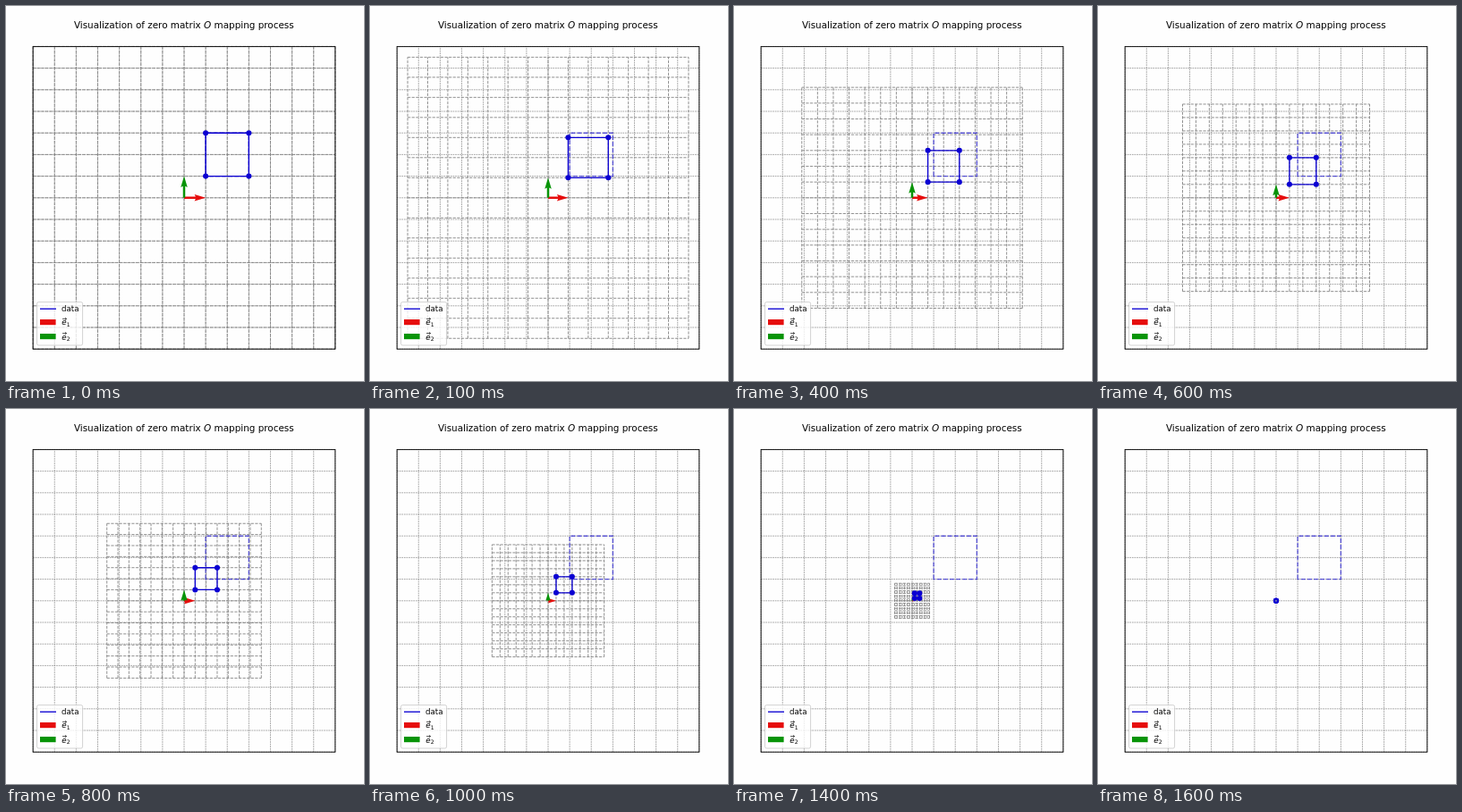
Recreate the animation shown at these times as an HTML page. Size 400x420 px, loop 1700 ms.

```html
<!DOCTYPE html>
<html lang="en">
<head>
<meta charset="utf-8">
<title>Zero matrix mapping</title>
<style>
  html, body { margin: 0; width: 100%; height: 100%; overflow: hidden; background: #fefefe; }
  svg { display: block; width: 400px; height: 420px; }
  text { font-family: "DejaVu Sans", sans-serif; font-size: 8.7px; fill: #000; }
  .title { font-size: 10.42px; text-anchor: middle; }
  .it { font-style: italic; }
  .sub { font-size: 6.1px; }
  .line { fill: none; stroke: #0b00d2; stroke-width: 1.35; }
  .ghost { stroke-dasharray: 5 2.1; stroke-opacity: .62; }
  .grid { fill: none; stroke: #808080; stroke-width: .7; stroke-dasharray: 1.7 .9; }
  .mapped { stroke-width: .87; stroke-dasharray: 3.2 1.4; }
  .frame { fill: none; stroke: #000; stroke-width: .9; }
  .e1 { fill: #e60d0d; }
  .e2 { fill: #089408; }
  .dots { fill: #0b00d2; }
  .vec { fill: none; stroke: #000; stroke-width: .65; }
</style>
</head>
<body>
<svg viewBox="0 0 400 420">
  <text class="title" x="198.8" y="25.2">Visualization of zero matrix <tspan class="it">O</tspan> mapping process</text>
  <path class="grid" id="base"/>
  <path class="grid mapped" id="mapped"/>
  <path class="e1" id="e1"/>
  <path class="e2" id="e2"/>
  <path class="line ghost" id="ghost"/>
  <path class="line" id="square"/>
  <g class="dots" id="dots"></g>
  <circle id="core" r="1" fill="#7474b4"/>
  <rect class="frame" id="frame"/>

  <rect x="34.6" y="331.6" width="51" height="48.4" rx="1.8" fill="#fff" fill-opacity=".8" stroke="#ccc" stroke-width=".87"/>
  <path class="line" d="M38 339.2H56"/>
  <text x="62" y="342.2">data</text>
  <rect class="e1" x="38" y="351" width="17.6" height="6.2"/>
  <rect class="e2" x="38" y="367" width="17.6" height="6.2"/>
  <g id="names"></g>
</svg>
<script>
const X0 = 199, Y0 = 214.8, UX = 24.12, UY = 24.2, HALF = 7;
const STEP = 100, COUNT = 17;
const HEAD = 12.5, SHAFT = 2.5;
const CORNERS = [[1, 1], [1, 3], [3, 3], [3, 1]];
// [step, scale]
const KEYS = [[0, 1], [2, .859], [4, .73], [6, .619], [8, .511], [12, .231], [16, 0]];

const $ = id => document.getElementById(id);
const setPath = (id, d) => $(id).setAttribute('d', d);
const px = x => (X0 + x * UX).toFixed(2);
const py = y => (Y0 - y * UY).toFixed(2);

function make(tag, parent, attrs, text = '') {
  const el = document.createElementNS('http://www.w3.org/2000/svg', tag);
  for (const k in attrs) el.setAttribute(k, attrs[k]);
  el.textContent = text;
  return parent.appendChild(el);
}

function gridPath(s) {
  let d = '';
  const h = HALF * s;
  for (let i = -HALF; i <= HALF; i++) {
    d += `M${px(i * s)} ${py(-h)}V${py(h)}M${px(-h)} ${py(i * s)}H${px(h)}`;
  }
  return d;
}

const squarePath = s =>
  'M' + CORNERS.map(([x, y]) => px(x * s) + ' ' + py(y * s)).join('L') + 'Z';

// Arrows shorter than their head shrink as a whole.
function arrowPath(len, dx, dy) {
  const k = Math.min(1, len / HEAD);
  const w = SHAFT * k / 2, neck = len - HEAD * .9 * k, back = len - HEAD * k;
  const pts = [[0, -w], [neck, -w], [back, -3 * w], [len, 0], [back, 3 * w], [neck, w], [0, w]];
  return 'M' + pts.map(([a, b]) =>
    (X0 + a * dx - b * dy).toFixed(2) + ' ' + (Y0 + a * dy + b * dx).toFixed(2)).join('L') + 'Z';
}

function scaleAt(step) {
  const i = KEYS.findIndex(k => k[0] >= step);
  if (KEYS[i][0] === step) return KEYS[i][1];
  const [a, sa] = KEYS[i - 1], [b, sb] = KEYS[i];
  return sa + (sb - sa) * (step - a) / (b - a);
}

const dots = CORNERS.map(() => make('circle', $('dots'), { r: 3.05 }));

function draw(step) {
  const s = scaleAt(step);
  setPath('mapped', s ? gridPath(s) : '');
  setPath('square', squarePath(s));
  setPath('e1', arrowPath(s * UX, 1, 0));
  setPath('e2', arrowPath(s * UY, 0, -1));
  dots.forEach((dot, i) => {
    dot.setAttribute('cx', px(CORNERS[i][0] * s));
    dot.setAttribute('cy', py(CORNERS[i][1] * s));
  });
  $('core').setAttribute('visibility', s ? 'hidden' : 'visible');
}

setPath('base', gridPath(1));
setPath('ghost', squarePath(1));
for (const [k, v] of Object.entries({ cx: X0, cy: Y0 })) $('core').setAttribute(k, v);
for (const [k, v] of Object.entries({
  x: px(-HALF), y: py(HALF), width: 2 * HALF * UX, height: 2 * HALF * UY
})) $('frame').setAttribute(k, v);

[357.4, 373.6].forEach((y, i) => {
  const g = $('names');
  make('text', g, { x: 62.2, y, class: 'it' }, 'e');
  make('text', g, { x: 67.8, y: y + 1.6, class: 'sub' }, i + 1);
  make('path', g, { class: 'vec', d: `M63 ${y - 7}h4.6m-1.5 -1.3l1.5 1.3l-1.5 1.3` });
});

let last = -1;
const start = performance.now();
function tick() {
  const step = Math.floor((performance.now() - start) / STEP) % COUNT;
  if (step !== last) draw(last = step);
  requestAnimationFrame(tick);
}
tick();
</script>
</body>
</html>
```
